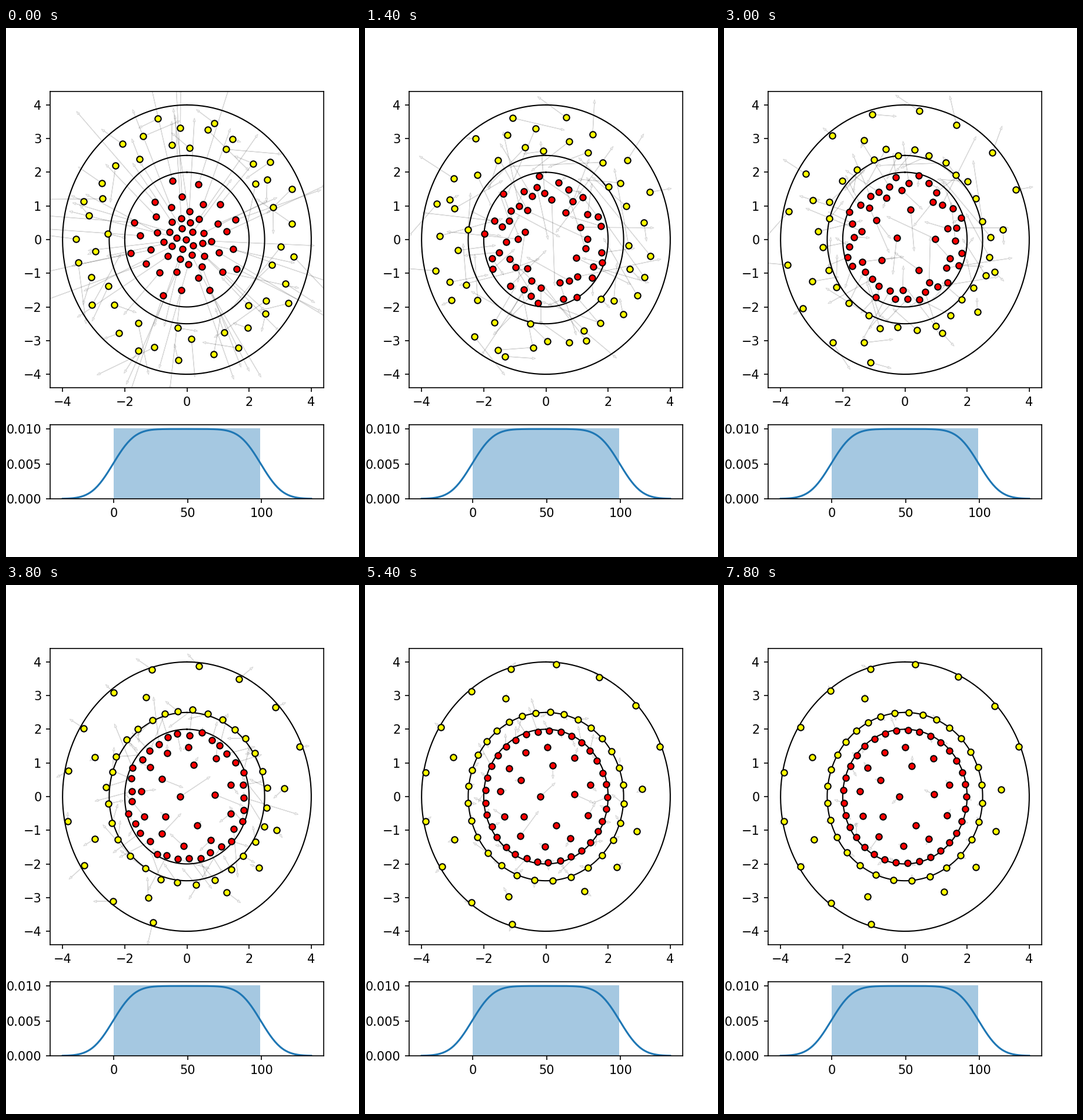
Recreate the animation shown at these times as a matplotlib script. Size 600 px wide and 900 px high, loop 8 s.

```python
import numpy as np
import matplotlib.pyplot as plt
from matplotlib.animation import FuncAnimation
from matplotlib.collections import PolyCollection

FRAMES, INTERVAL = 40, 200
DT = 0.043  # simulated time per frame
COUNT = 50  # charges of each sign
rng = np.random.default_rng(4)


def polar(r, degrees):
    """Points by radius and clockwise angle from the top."""
    a = np.radians(degrees)
    return np.column_stack([r * np.sin(a), r * np.cos(a)])


def ring(n, r, first, swell=0, waves=1, phase=0):
    """Points around a circle, slightly denser on one side."""
    k = np.arange(n) / n
    bend = swell * np.sin(2 * np.pi * waves * k + phase)
    return polar(r, first + 360 * k + bend)


def arc(n, r, first, last):
    return polar(r, np.linspace(first, last, n))


def radius(p):
    return np.maximum(np.hypot(p[:, 0], p[:, 1]), 1e-6)[:, None]


def spread(p, gap=0.3):
    """Push apart charges that come too close."""
    for _ in range(8):
        d = p[:, None] - p[None]
        r = np.hypot(d[..., 0], d[..., 1]) + np.eye(len(p))
        push = np.clip(gap - r, 0, None) / np.maximum(r, 0.01) / 2
        p = p + (d * push[..., None]).sum(axis=1)
    return p


def settle(start, inner, rim):
    """Nearest charges take the loose places, the others share the rim."""
    end = np.empty_like(start)
    free = list(range(len(start)))
    for goal in inner:
        i = min(free, key=lambda j: np.hypot(*(start[j] - goal)))
        end[i] = goal
        free.remove(i)
    free.sort(key=lambda j: np.arctan2(*start[j]) % (2 * np.pi))
    turns = [np.roll(rim, k, axis=0) for k in range(len(free))]
    end[free] = min(turns, key=lambda r: ((r - start[free]) ** 2).sum())
    return end


class Charges:
    def __init__(self, start, end, v0, wobble, low, high):
        self.start, self.end, self.v0 = start, end, v0
        self.low, self.high = low, high
        n = len(start)
        self.swing = wobble * rng.normal(0, 1, (n, 2))
        self.omega = rng.uniform(0.5, 0.9, (n, 1))

    def path(self, t):
        pull = (self.start - self.end) * np.exp(-(t / 13) ** 2)
        burst = self.v0 * t * np.exp(-(t / 8) ** 2)
        fade = np.exp(-t / 14) * (1 - np.exp(-t / 3))
        sway = self.swing * fade * np.sin(self.omega * t)
        return self.bounce(self.end + pull + burst + sway)

    def bounce(self, p):
        r = radius(p)
        folded = np.where(r > self.high, 2 * self.high - r, r)
        folded = np.where(r < self.low, 2 * self.low - r, folded)
        return p * np.clip(folded, self.low, self.high) / r

    def state(self, t):
        h = 0.05
        v = (self.path(t + h) - self.path(t - h)) / (2 * h * DT)
        return self.bounce(spread(self.path(t))), v


# Both clouds begin as jittered sunflower spirals
u = (np.arange(COUNT) + 0.5) / COUNT
golden = 137.508 * np.arange(COUNT)


def jitter(p, size):
    return spread(p + rng.normal(0, size, p.shape))


red_start = jitter(polar(1.9 * u ** 0.9, golden), 0.06)
red_inner = np.vstack([polar(0.18, [270]), ring(5, 0.93, 14),
                       ring(11, 1.47, 1, 18, 0.5)])
red_end = settle(red_start, red_inner, ring(33, 1.98, 2.9))
burst = red_start / radius(red_start) * rng.uniform(1.5, 4, (COUNT, 1))
burst = (burst + rng.normal(0, 0.4, burst.shape)) * DT

yellow_start = jitter(polar(np.sqrt(6.8 + 7.4 * u), golden), 0.1)
yellow_loose = np.vstack([arc(12, 3.95, 196, 428), arc(4, 3.1, 86, 156),
                          arc(4, 3.2, 202, 336)])
yellow_end = settle(yellow_start, yellow_loose, ring(30, 2.5, 5.7, -8, 1, 0.38))
drift = rng.normal(0, 0.7, (COUNT, 2)) * DT

reds = Charges(red_start, red_end, burst, 0.14, 0, 1.98)
yellows = Charges(yellow_start, yellow_end, drift, 0.06, 2.5, 3.96)


def arrows(p, v):
    along = v / radius(v)
    n = along[:, ::-1] * (-0.035, 0.035)
    q = p + v
    return np.stack([p, q, q + n, q + 0.1 * along, q - n, q, p], axis=1)


fig, (ax, low) = plt.subplots(2, 1, figsize=(4, 6), dpi=150,
                              gridspec_kw={"height_ratios": [4, 1]})
ax.set(xlim=(-4.4, 4.4), ylim=(-4.4, 4.4),
       xticks=range(-4, 5, 2), yticks=range(-4, 5))
for r in (2, 2.5, 4):
    ax.plot(*polar(r, np.linspace(0, 360, 300)).T, "k", lw=1)

field = PolyCollection([], facecolors="none", edgecolors=(0, 0, 0, 0.15),
                       linewidths=0.6, zorder=1)
ax.add_collection(field, autolim=False)
groups = []
for charges, color in ((yellows, "yellow"), (reds, "red")):
    dots, = ax.plot([], [], "o", ms=5, mfc=color, mec="k", mew=1, zorder=3)
    groups.append((charges, dots))

# Uniform samples 0..99 with their kernel density estimate
data = np.arange(100)
bw = data.std(ddof=1) * len(data) ** -0.2
x = np.linspace(-3 * bw, 99 + 3 * bw, 200)
z = (x[:, None] - data) / bw
low.bar(0, 1 / 99, width=99, align="edge", color="C0", alpha=0.4)
low.plot(x, np.exp(-z * z / 2).mean(axis=1) / (bw * np.sqrt(2 * np.pi)), "C0")
pad = 0.05 * (x[-1] - x[0])
low.set(xlim=(x[0] - pad, x[-1] + pad), ylim=(0, 1.05 / 99),
        xticks=(0, 50, 100), yticks=(0, 0.005, 0.01))
low.yaxis.set_major_formatter("{x:.3f}")


def update(i):
    shapes = []
    for charges, dots in groups:
        p, v = charges.state(i)
        dots.set_data(*p.T)
        shapes.extend(arrows(p, v))
    field.set_verts(shapes)
    return [field] + [dots for _, dots in groups]


anim = FuncAnimation(fig, update, frames=FRAMES, interval=INTERVAL,
                     init_func=lambda: update(0), repeat=True)
plt.show()
```
